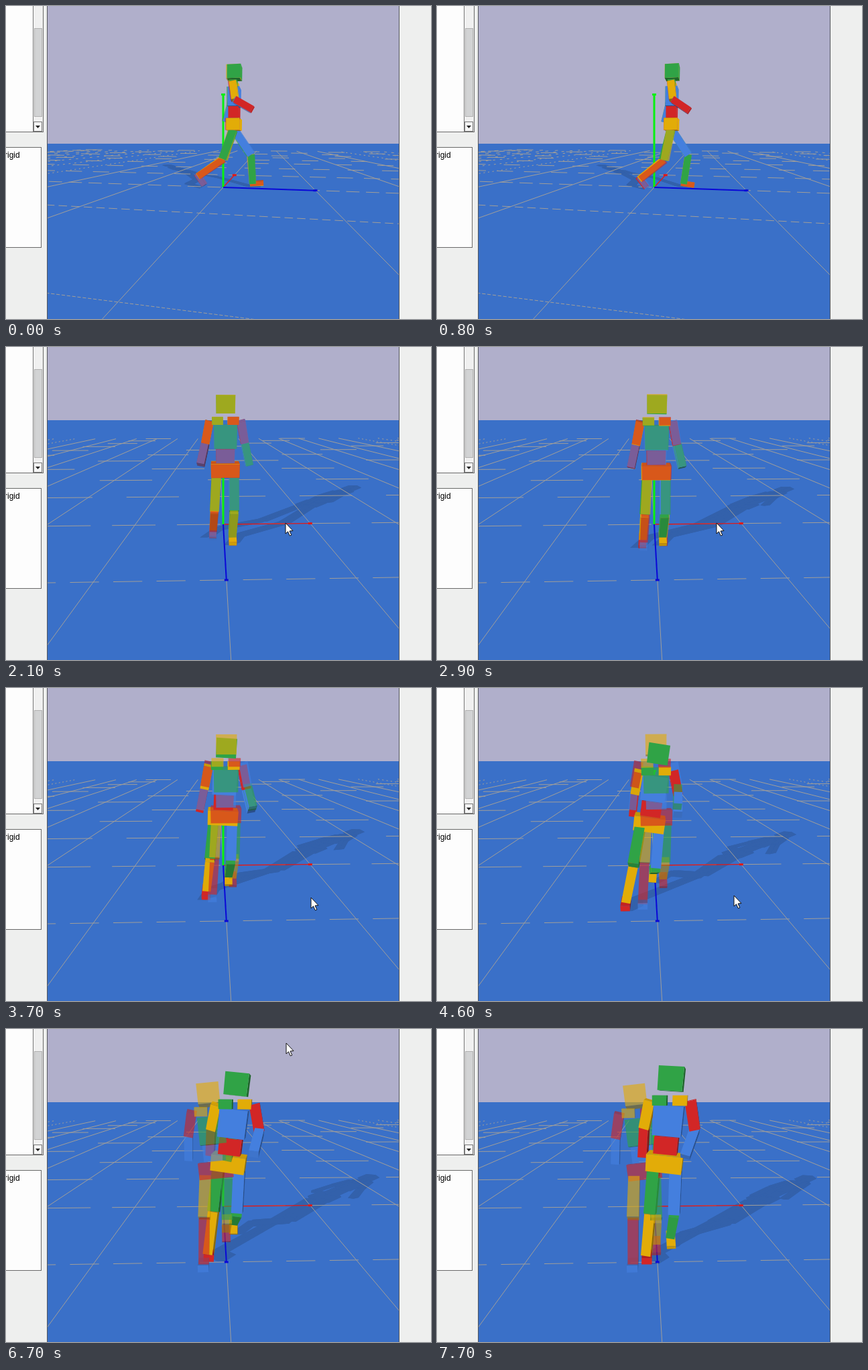
An HTML page with a canvas that plays this animation: 634x466 px, repeating every 7800 ms.

```html
<!DOCTYPE html>
<html lang="en">
<head>
<meta charset="utf-8">
<title>Walking box figure</title>
<style>
  html, body { margin: 0; width: 100%; height: 100%; overflow: hidden; background: #eeefee; }
  canvas { display: block; }
</style>
</head>
<body>
<canvas id="stage" width="634" height="466"></canvas>
<script>
const ctx = document.getElementById('stage').getContext('2d');
const LOOP = 7800, FOCAL = 356, DISTANCE = 2.72, CENTER_X = 324, GRID = 10;
const LIGHT = [-0.72, 0.4, 0.56];
const THIGH = 0.32, SHIN = 0.33;
const COLORS = [[68, 127, 222], [48, 163, 70], [226, 172, 8], [210, 38, 38]]; // blue, green, yellow, red

// Vector helpers; x is sideways, y up, z the walking direction
const add = (a, b, k = 1) => a.map((v, i) => v + b[i] * k);
const dot = (a, b) => a[0] * b[0] + a[1] * b[1] + a[2] * b[2];
const unit = a => a.map(v => v / Math.hypot(...a));
const cross = (a, b) => [a[1] * b[2] - a[2] * b[1], a[2] * b[0] - a[0] * b[2], a[0] * b[1] - a[1] * b[0]];
const perpendicular = (a, axis) => unit(add(a, axis, -dot(a, axis)));
const mix = (a, b, k) => Array.isArray(a) ? a.map((v, i) => mix(v, b[i], k)) : a + (b - a) * k;

// Motion helpers
const bump = (t, middle, width) => Math.exp(-(((t - middle) / width) ** 2));
function ease(t, from, to) {
  const k = Math.min(1, Math.max(0, (t - from) / (to - from)));
  return k * k * (3 - 2 * k);
}
function sample(keys, time) {
  const next = keys.findIndex(key => key[0] > time);
  if (next < 0) return keys[keys.length - 1][1];
  if (next === 0) return keys[0][1];
  const [t0, a] = keys[next - 1], [t1, b] = keys[next];
  return mix(a, b, (time - t0) / (t1 - t0));
}

// Orbiting camera: yaw, pitch, screen height of the origin
const cameraKeys = [[950, [10, 11.05, 270]], [1400, [41, 19.4, 268]], [2000, [88.6, 25, 264]]];
let camera;

function aimCamera(time) {
  const [yaw, pitch, centerY] = sample(cameraKeys, time);
  const a = yaw * Math.PI / 180, p = pitch * Math.PI / 180;
  const sinA = Math.sin(a), cosA = Math.cos(a), sinP = Math.sin(p), cosP = Math.cos(p);
  const back = DISTANCE * cosP;
  camera = { sinA, cosA, sinP, cosP, centerY, eye: [-back * cosA, DISTANCE * sinP, back * sinA] };
}

function toView([x, y, z]) {
  const { sinA, cosA, sinP, cosP } = camera;
  const away = x * cosA - z * sinA;
  return [z * cosA + x * sinA, y * cosP + away * sinP, DISTANCE + away * cosP - y * sinP];
}
const toScreen = ([right, up, depth]) =>
  [CENTER_X + FOCAL * right / depth, camera.centerY - FOCAL * up / depth];
const project = p => toScreen(toView(p));

// A box around the segment a-b, as six faces
function box(a, b, width, depth, color, sideways) {
  const along = add(b, a, -1), axis = unit(along);
  const side = perpendicular(Math.abs(axis[0]) > 0.8 ? [0, 0, 1] : sideways, axis);
  const center = mix(a, b, 0.5);
  const half = [[axis, Math.hypot(...along) / 2], [side, width / 2], [cross(axis, side), depth / 2]];
  return half.flatMap(([normal, size], i) => [1, -1].map(sign => {
    const [u, us] = half[(i + 1) % 3], [v, vs] = half[(i + 2) % 3];
    const middle = add(center, normal, sign * size);
    const points = [[1, 1], [-1, 1], [-1, -1], [1, -1]].map(([p, q]) => add(add(middle, u, p * us), v, q * vs));
    return { normal: normal.map(n => n * sign), middle, points, color };
  }));
}

// Two-bone leg that bends its knee forward
function bendLeg(hip, foot) {
  const toFoot = add(foot, hip, -1), down = unit(toFoot);
  const reach = Math.min(Math.hypot(...toFoot), THIGH + SHIN - 0.001);
  const part = (THIGH ** 2 - SHIN ** 2 + reach ** 2) / (2 * reach);
  const knee = add(add(hip, down, part), perpendicular([0, 0, 1], down), Math.sqrt(THIGH ** 2 - part ** 2));
  return [knee, add(hip, down, reach)];
}

// Arm segment direction from forward and outward angles in degrees
function swingDirection(forward, outward, sign) {
  const tan = degrees => Math.tan(degrees * Math.PI / 180);
  return unit([sign * tan(outward), -1, tan(forward)]);
}

const solidGait = { sway: -0.08, drift: 0.05, turn: 0.2, reach: 1.24, push: 0.021, lift: 0.12, lead: () => 0, lean: 0 };
const ghostGait = {
  sway: 0, drift: -0.1, turn: 0, reach: 1.34, push: 0.025, lift: 0.02, lean: -0.09,
  lead: t => -0.01 + 0.025 * ease(t, 0.5, 1.3) - 0.1 * ease(t, 6.7, 7.8)
};

// All faces of a walker after t seconds
function walker(t, gait) {
  const sway = gait.sway * bump(t, 5.2, 1.4), drift = gait.drift * ease(t, 4, 7.7);
  const turn = gait.turn * ease(t, 4, 6.5);
  const sideways = [Math.cos(turn), 0, Math.sin(turn)];
  const swing = Math.cos(Math.PI * t / 5.5);
  const pelvis = [0.01 + sway + drift, 0.69 + 0.9 * sway + 0.6 * drift, 0.12 + 0.088 * t + gait.lead(t)];
  const neck = add(pelvis, [0.45 * drift - 0.8 * sway, 0.4, gait.lean * ease(t, 3.9, 5.5)]);
  const spine = unit(add(neck, pelvis, -1));
  const torso = (from, to, width, depth, color) =>
    box(add(pelvis, spine, from), add(pelvis, spine, to), width, depth, color, sideways);
  const faces = [
    torso(-0.06, 0.06, 0.25, 0.14, 2),
    torso(0.065, 0.18, 0.16, 0.11, 3),
    torso(0.185, 0.37, 0.19, 0.12, 0),
    torso(0.455, 0.585, 0.15, 0.14, 1)
  ];
  const feet = [
    [-0.11 + 2.2 * sway + 0.7 * drift, 0.03 + 0.11 * (1 - ease(t, 0, 2.4)), -0.3 + gait.reach * ease(t, -0.8, 6.3)],
    [0.085 + 1.6 * sway + 0.9 * drift, 0.04 + gait.lift * bump(t, 5.6, 1.4), 0.33 + gait.push * Math.max(0, t - 3.5) ** 2]
  ];
  for (const left of [0, 1]) {
    const sign = left ? 1 : -1;
    const part = (a, b, width, depth, color) => faces.push(box(a, b, width, depth, color, sideways));

    const shoulder = add(neck, sideways, 0.13 * sign);
    const upperAngle = -5 - 15 * sign * swing;
    const foreAngle = upperAngle + 25 - 25 * sign * swing;
    const foreOut = 14 - (left ? 38 : 10) * ease(t, 3.5, 5.5);
    const elbow = add(shoulder, swingDirection(upperAngle, 13, sign), 0.18);
    const wrist = add(elbow, swingDirection(foreAngle, foreOut, sign), 0.2);
    part(mix(neck, shoulder, 0.15), mix(neck, shoulder, 0.85), 0.07, 0.06, 1 + left);
    part(shoulder, elbow, 0.07, 0.07, 2 + left);
    part(elbow, wrist, 0.064, 0.064, left ? 0 : 3);

    const hip = add(add(pelvis, sideways, 0.08 * sign), [0, -0.06, 0]);
    const [knee, ankle] = bendLeg(hip, feet[left]);
    const toe = perpendicular([0, 0, 1], unit(add(ankle, knee, -1)));
    part(hip, knee, 0.085, 0.085, 1 - left);
    part(knee, ankle, 0.075, 0.075, 2 - left);
    part(add(ankle, toe, -0.03), add(ankle, toe, 0.12), 0.075, 0.05, 3 - left);
  }
  return faces.flat();
}

function fillPath(points, style) {
  ctx.fillStyle = style;
  ctx.beginPath();
  points.forEach(p => ctx.lineTo(...p));
  ctx.fill();
}

function drawWalkers(body, ghost) {
  const ghostFaces = ghost.map(face => ({ ...face, color: (face.color + 1) % 4, alpha: 0.62 }));
  [...ghostFaces, ...body]
    .filter(face => dot(face.normal, add(face.middle, camera.eye, -1)) < 0)
    .sort((a, b) => toView(b.middle)[2] - toView(a.middle)[2])
    .forEach(({ normal, points, color, alpha = 1 }) => {
      const shade = Math.min(1, 0.62 + 0.8 * Math.max(0, dot(normal, LIGHT)));
      fillPath(points.map(project), `rgba(${COLORS[color].map(v => Math.round(v * shade))},${alpha})`);
    });
}

function drawShadow(faces) {
  for (const { points } of faces) {
    fillPath(points.map(p => project(add(p, LIGHT, -p[1] / LIGHT[1]))), '#3361ab');
  }
}

function gridLine(a, b) {
  const near = 0.3;
  let p = toView(a), q = toView(b);
  if (p[2] < near && q[2] < near) return;
  if (p[2] < near) p = mix(p, q, (near - p[2]) / (q[2] - p[2]));
  if (q[2] < near) q = mix(q, p, (near - q[2]) / (p[2] - q[2]));
  const [x0, y0] = toScreen(p), [x1, y1] = toScreen(q);
  const slope = Math.abs((y1 - y0) / (x1 - x0));
  // Thin, nearly level lines break up once per pixel row, more so far away
  const period = Math.min(200, 1 / slope);
  const filled = Math.min(0.67, 4.4 / (p[2] + q[2]));
  ctx.setLineDash(slope < 0.2 ? [filled * period, (1 - filled) * period] : []);
  ctx.beginPath();
  ctx.moveTo(x0, y0);
  ctx.lineTo(x1, y1);
  ctx.stroke();
}

function drawAxis(tip, color, width) {
  const [x0, y0] = project([0, 0, 0]), [x1, y1] = project(tip);
  ctx.strokeStyle = ctx.fillStyle = color;
  ctx.lineWidth = width;
  ctx.beginPath();
  ctx.moveTo(x0, y0);
  ctx.lineTo(x1, y1);
  ctx.stroke();
  ctx.fillRect(x1 - 3, y1 - 1.5, 6, 3);
}

function drawScene(time) {
  ctx.save();
  ctx.beginPath();
  ctx.rect(62, 0, 524, 466);
  ctx.clip();
  rect(62, 0, 524, 466, '#b0afcb');
  // The ground ends a little below the true horizon
  const horizon = camera.centerY - FOCAL * camera.sinP / camera.cosP + 26 * camera.sinP;
  rect(62, Math.round(horizon), 524, 466, '#3a70c8');

  const body = walker(time / 1000, solidGait);
  drawShadow(body);
  ctx.strokeStyle = '#a09e9a';
  ctx.lineWidth = 1;
  for (let i = -GRID; i <= GRID; i++) {
    gridLine([-GRID, 0, i], [GRID, 0, i]);
    gridLine([i, 0, -GRID], [i, 0, GRID]);
  }
  ctx.setLineDash([]);
  drawAxis([1, 0, 0], '#e01818', 1.3);
  drawAxis([0, 1, 0], '#08f010', 3);
  drawAxis([0, 0, 1], '#0808d8', 2);
  drawWalkers(body, walker(time / 1000, ghostGait));
  ctx.restore();
}

function rect(x, y, w, h, color) {
  ctx.fillStyle = color;
  ctx.fillRect(x, y, w, h);
}

function drawPanels() {
  rect(0, 0, 62, 466, '#eeefee');
  rect(586, 0, 48, 466, '#eeefee');
  rect(61, 0, 1, 466, '#55575c');
  rect(586, 0, 1, 466, '#55575c');
  // List with scroll bar
  rect(0, 0, 56, 188, '#696969');
  rect(0, 0, 55, 187, '#f0f0f0');
  rect(0, 0, 40, 187, '#fdfdfd');
  rect(40, 0, 1, 187, '#777');
  rect(42, 33, 12, 132, '#b0b0b0');
  rect(43, 34, 10, 130, '#d2d3d4');
  rect(41, 172, 13, 15, '#777');
  rect(42, 173, 11, 13, '#f6f6f6');
  fillPath([[44, 178], [51, 178], [47.5, 182]], '#222');
  // Text box
  rect(0, 210, 53, 150, '#696969');
  rect(0, 211, 52, 148, '#fdfdfd');
  ctx.fillStyle = '#000';
  ctx.font = '12px "Liberation Sans", Arial, sans-serif';
  ctx.fillText('rigid', -2, 226);
}

const cursorKeys = [
  [1000, [559, 31]], [1400, [504, 192]], [2000, [417, 262]], [3300, [417, 262]], [3700, [455, 312]],
  [5500, [431, 305]], [5800, [431, 305]], [6400, [418, 21]], [6700, [418, 21]], [6800, [418, 12]]
];

function drawCursor(time) {
  if (time < 1000 || time > 6800) return;
  const [x, y] = sample(cursorKeys, time).map(Math.round);
  const outline = [[0, 0], [0, 16], [3.5, 12.8], [6.3, 19], [8.8, 18], [6, 12], [11, 11.6]];
  fillPath(outline.map(([dx, dy]) => [x + dx, y + dy]), '#fff');
  ctx.closePath();
  ctx.strokeStyle = '#111';
  ctx.lineWidth = 1;
  ctx.stroke();
}

let shown = -1;
function frame(now) {
  const step = Math.floor(now % LOOP / 100);
  const time = step < 2 ? 0 : step * 100;
  if (time !== shown) {
    shown = time;
    aimCamera(time);
    drawScene(time);
    drawPanels();
    drawCursor(time);
  }
  requestAnimationFrame(frame);
}
frame(0);
</script>
</body>
</html>
```
